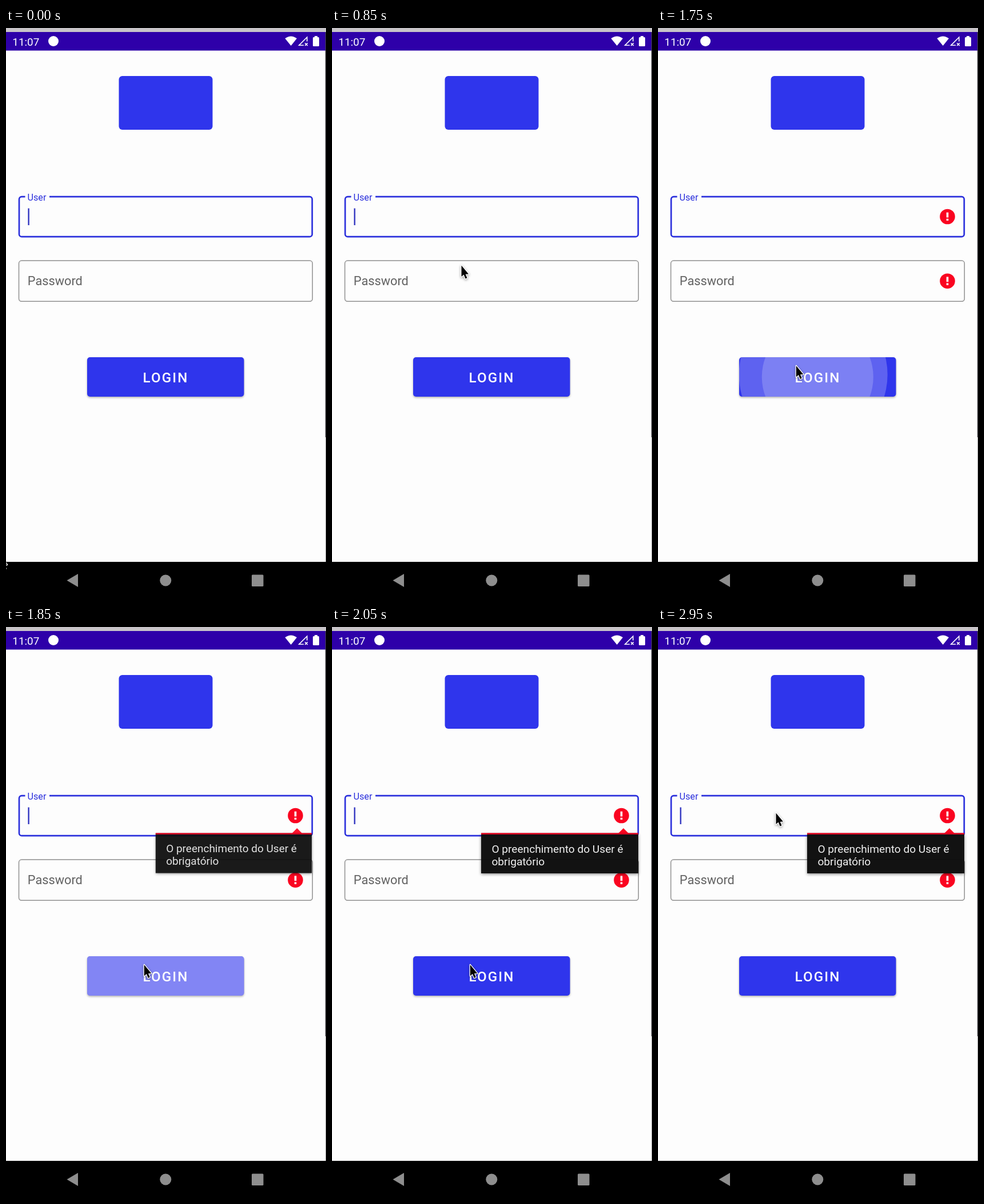
An HTML page with a canvas that plays this animation: 560x999 px, repeating every 3 s.

```html
<!DOCTYPE html>
<html lang="pt">
<head>
<meta charset="utf-8">
<title>Login</title>
<style>
  html, body { margin: 0; width: 100%; height: 100%; overflow: hidden; background: #fdfdfd; }
  canvas { display: block; width: 560px; height: 999px; }
</style>
</head>
<body>
<canvas id="stage" width="560" height="999"></canvas>
<script>
const ctx = document.getElementById('stage').getContext('2d');
const LOOP = 3000, STEP = 50;
const BLUE = '#2f35ec', LINE = '#2b30dc', RED = '#fa0420', FONT = 'Roboto, sans-serif';
const BTN = { x: 142, y: 576, w: 274.5, h: 69 };

const clamp = v => Math.max(0, Math.min(1, v));
const mix = (a, b, p) => a + (b - a) * p;
const span = (t, from, to) => clamp((t - from) / (to - from));
const ease = p => p * p * (3 - 2 * p);

function rect(x, y, w, h, fill) {
  ctx.fillStyle = fill;
  ctx.fillRect(x, y, w, h);
}

function round(x, y, w, h, r) {
  ctx.beginPath();
  ctx.roundRect(x, y, w, h, r);
}

function disc(x, y, r, fill) {
  ctx.fillStyle = fill;
  ctx.beginPath();
  ctx.arc(x, y, r, 0, Math.PI * 2);
  ctx.fill();
}

function poly(points, fill) {
  ctx.beginPath();
  points.forEach(([x, y]) => ctx.lineTo(x, y));
  ctx.closePath();
  if (fill) {
    ctx.fillStyle = fill;
    ctx.fill();
  }
}

function label(str, x, y, size, fill, weight = 400, spacing = 0) {
  ctx.font = `${weight} ${size}px ${FONT}`;
  ctx.letterSpacing = spacing + 'px';
  ctx.fillStyle = fill;
  ctx.fillText(str, x, y);
}

function shadow(color, blur, dy) {
  ctx.shadowColor = color;
  ctx.shadowBlur = blur;
  ctx.shadowOffsetY = dy;
}

function statusBar() {
  rect(0, 0, 560, 7, '#c8c5c9');
  rect(0, 7, 559, 32.5, '#2e00a9');
  label('11:07', 11.3, 30.7, 18.9, '#fff');
  disc(83, 23, 9, '#fff');

  // Wi-Fi fan
  ctx.beginPath();
  ctx.moveTo(498.7, 31);
  ctx.lineTo(488.3, 18.3);
  ctx.quadraticCurveTo(498.7, 10.7, 509, 18.3);
  ctx.closePath();
  ctx.fill();

  // Mobile signal without data
  ctx.strokeStyle = '#fff';
  ctx.lineWidth = 1.6;
  ctx.beginPath();
  ctx.moveTo(521, 30.2);
  ctx.lineTo(512.8, 30.2);
  ctx.lineTo(526.8, 16.2);
  ctx.lineTo(526.8, 23.5);
  ctx.moveTo(523.2, 26.4);
  ctx.lineTo(527.8, 31);
  ctx.moveTo(527.8, 26.4);
  ctx.lineTo(523.2, 31);
  ctx.stroke();

  round(537, 16, 11, 16, 1.5);
  ctx.fill();
  rect(540, 14, 5, 3, '#fff');
}

function navBar() {
  rect(0, 934, 560, 65, '#000');
  poly([[106.5, 966.5], [126, 955], [126, 978]], '#8e8e8e');
  disc(279.3, 966.5, 10, '#8e8e8e');
  round(430, 956.5, 20.5, 20.5, 1.5);
  ctx.fill();
}

function errorIcon(x, y) {
  disc(x, y, 13.3, RED);
  rect(x - 1.8, y - 7.3, 3.6, 8.8, '#fff');
  rect(x - 1.8, y + 3.7, 3.6, 3.4, '#fff');
}

function form(t) {
  round(197.5, 84, 164, 94, 6);
  ctx.fillStyle = BLUE;
  ctx.fill();

  ctx.strokeStyle = LINE;
  ctx.lineWidth = 2.7;
  round(23, 295.2, 512.8, 70, 4.5);
  ctx.stroke();
  rect(33.5, 292, 42.5, 6, '#fdfdfd');
  label('User', 37.5, 301.5, 16.2, LINE);
  if ((t + 200) % 1000 < 500) rect(38.4, 315.5, 2.4, 29.5, '#3236c0');

  ctx.strokeStyle = '#8f8f8f';
  ctx.lineWidth = 1.5;
  round(22.5, 407, 513.8, 71.3, 4.8);
  ctx.stroke();
  label('Password', 37.8, 450, 21.75, '#626262');

  if (t >= 1750) {
    errorIcon(506.5, 330);
    errorIcon(506.5, 442.7);
  }
}

function ripple(t, start, time, x, y) {
  const age = t - start;
  if (age < 0 || t >= 2050) return;
  const p = ease(clamp(age / time));
  const alpha = 0.225 * clamp(age / 60) * (1 - span(t, 1880, 2030));
  const cx = BTN.x + BTN.w / 2, cy = BTN.y + BTN.h / 2;
  disc(mix(x, cx, p), mix(y, cy, p), mix(82, 142, p), `rgba(255,255,255,${alpha})`);
}

function button(t) {
  ctx.save();
  shadow('rgba(0,0,0,0.3)', 3.5, 1.8);
  round(BTN.x, BTN.y, BTN.w, BTN.h, 5);
  ctx.fillStyle = BLUE;
  ctx.fill();
  ctx.restore();

  ctx.save();
  round(BTN.x, BTN.y, BTN.w, BTN.h, 5);
  ctx.clip();
  ripple(t, 1643, 150, 241, 590);
  ripple(t, 1700, 150, 279.3, 610.5);
  ctx.restore();
  label('LOGIN', 239.4, 620.2, 24.15, '#fff', 500, 2.16);
}

function popup(t) {
  const u = span(t, 1760, 1880);
  if (!u) return;
  const p = 1 - (1 - u) ** 2, s = mix(0.9, 1, p);
  ctx.save();
  ctx.globalAlpha = p;
  ctx.translate(398.5, 361);
  ctx.scale(s, s);
  ctx.translate(-398.5, -361);

  ctx.save();
  shadow('rgba(0,0,0,0.5)', 5, 1.5);
  rect(261, 361, 275, 70, 'rgba(14,14,14,0.96)');
  ctx.restore();
  poly([[500, 362], [510, 352], [520, 362]], RED);
  rect(261, 360.3, 275, 2.7, '#d9041f');
  label('O preenchimento do User é', 279.4, 394.7, 19.12, '#f1f1f1');
  label('obrigatório', 279.4, 416.8, 19.12, '#f1f1f1');
  ctx.restore();
}

// Pointer stops: time, x, y
const stops = [
  [0, -11, 924], [700, 226, 415.5], [900, 226, 415.5], [1300, 241.3, 591],
  [2700, 241.3, 591], [2950, 206, 325.5]
];

function pointer(t) {
  const i = Math.max(1, stops.findIndex(s => t <= s[0]));
  const [t0, x0, y0] = stops[i - 1], [t1, x1, y1] = stops[i];
  const p = ease(span(t, t0, t1));
  ctx.save();
  ctx.translate(mix(x0, x1, p), mix(y0, y1, p));
  poly([[0.5, 0], [0.5, 19.5], [4.6, 16], [7.5, 23], [10.5, 21.8], [7.6, 15.2], [13, 15]]);
  ctx.lineJoin = 'round';
  ctx.lineWidth = 2.6;
  ctx.strokeStyle = '#fff';
  ctx.save();
  shadow('rgba(0,0,0,0.4)', 4, 1.5);
  ctx.stroke();
  ctx.restore();
  ctx.fillStyle = '#000';
  ctx.fill();
  ctx.restore();
}

function draw(t) {
  rect(0, 0, 560, 999, '#fdfdfd');
  statusBar();
  rect(558.8, 7, 1.2, 709, '#3a383d');
  rect(558.8, 716, 1.2, 218, '#b9b7ba');
  navBar();
  form(t);
  button(t);
  popup(t);
  pointer(t);
}

const begin = performance.now();
function tick() {
  const t = (performance.now() - begin) % LOOP;
  draw(Math.floor(t / STEP) * STEP);
  requestAnimationFrame(tick);
}
tick();
</script>
</body>
</html>
```
